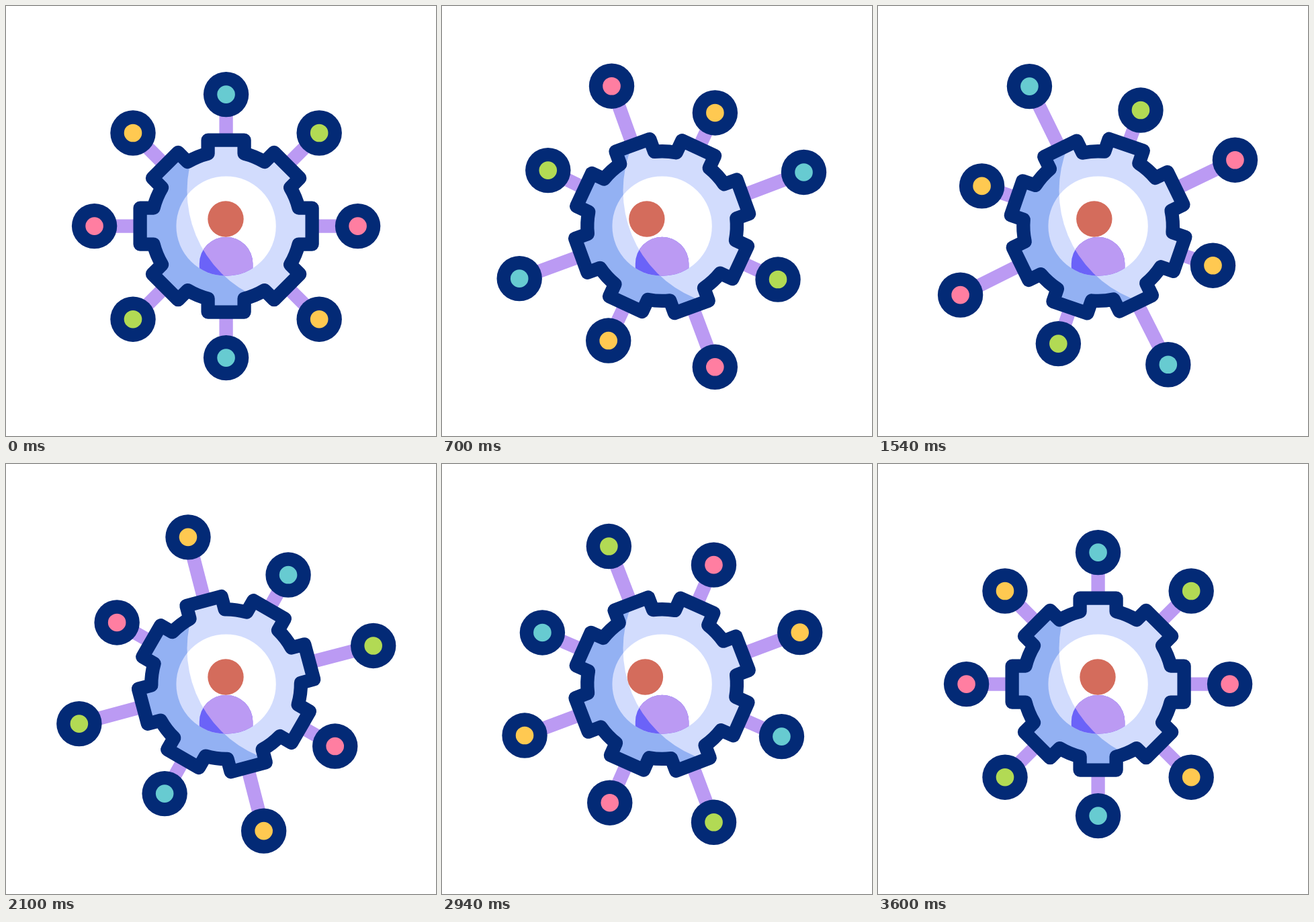
These frames come from a looping animation (640x640 px, 3.62 s). An HTML page with a canvas:

```html
<!DOCTYPE html>
<html lang="en">
<head>
<meta charset="utf-8">
<title>Gear network</title>
<style>
  html, body { margin: 0; width: 100%; height: 100%; overflow: hidden; background: #fff; }
  canvas { display: block; width: 640px; height: 640px; }
</style>
</head>
<body>
<canvas id="stage" width="640" height="640"></canvas>
<script>
const ctx = document.getElementById('stage').getContext('2d');
const LOOP = 3620, STEP = 20, TURN = 3600;
const CENTER = 327.6, ORBIT = 196, LINE = 20.3, INNER = 74.2;
const NAVY = '#032a76', LILAC = '#bb9af3', LIGHT = '#d2dcfd', SHADE = '#93b1f3';
const TEAL = '#67cbd1', GREEN = '#b2da54', PINK = '#ff7ea1', YELLOW = '#ffc951';

// Offsets are [radial, tangential] at the odd and even beats.
const nodes = [
  { angle: 0,   color: PINK,   odd: [-18, -1.8],   even: [36.5, -2.3] },
  { angle: 45,  color: YELLOW, odd: [38.5, 2.3],   even: [-16.3, 0] },
  { angle: 90,  color: TEAL,   odd: [-17.9, -1.3], even: [39.2, -0.6] },
  { angle: 135, color: GREEN,  odd: [38.9, 1.1],   even: [-15.5, 3.9] },
  { angle: 180, color: PINK,   odd: [-17.3, -1.4], even: [33.4, 1.1] },
  { angle: 225, color: YELLOW, odd: [38.5, 2.9],   even: [-18.8, -0.4] },
  { angle: 270, color: TEAL,   odd: [-17.9, -2.1], even: [38.4, -3.4] },
  { angle: 315, color: GREEN,  odd: [38.9, -0.3],  even: [-14.5, -1] }
];

const rad = deg => deg * Math.PI / 180;
const mix = (a, b, k) => a + (b - a) * k;
const smooth = x => x * x * (3 - 2 * x);

// Eases through evenly spaced keys; key(i) gives the value at beat i.
function tween(t, beats, key) {
  const p = t / TURN * beats;
  const i = Math.min(Math.floor(p), beats - 1);
  return mix(key(i), key(i + 1), smooth(p - i));
}

function nodeOffset(node, t, axis) {
  return tween(t, 9, i => i % 9 === 0 ? 0 : (i % 2 ? node.odd : node.even)[axis]);
}

function headOffset(t) {
  return tween(t, 6, i => i % 6 === 0 ? 0 : (i % 2 ? -26 : 26));
}

function disc(x, y, r, color) {
  ctx.fillStyle = color;
  ctx.beginPath();
  ctx.arc(x, y, r, 0, 2 * Math.PI);
  ctx.fill();
}

function buildGear() {
  const gear = new Path2D();
  const half = 27, base = 108, tip = 128;
  const root = Math.hypot(half, base), slope = Math.atan2(half, base);
  for (let i = 0; i < 8; i++) {
    const a = i * Math.PI / 4, c = Math.cos(a), s = Math.sin(a);
    const to = (x, y) => gear.lineTo(x * c - y * s, x * s + y * c);
    to(base, -half);
    to(tip, -half);
    to(tip, half);
    to(base, half);
    gear.arc(0, 0, root, a + slope, a + Math.PI / 4 - slope);
  }
  gear.closePath();
  return gear;
}
const gear = buildGear();

// Paints the dark colour everywhere, then the lit colour inside a large disc.
function paintLit(dark, lit) {
  ctx.fillStyle = dark;
  ctx.fillRect(0, 0, 640, 640);
  disc(442.5, 275, 173, lit);
}

function clipped(path, paint) {
  ctx.save();
  ctx.clip(path);
  paint();
  ctx.restore();
}

const innerCircle = new Path2D();
innerCircle.arc(CENTER, CENTER, INNER, 0, 2 * Math.PI);

const torso = new Path2D();
torso.arc(CENTER, 383.5, 39.8, Math.PI, 0);
torso.lineTo(CENTER + 39.8, 410);
torso.lineTo(CENTER - 39.8, 410);
torso.closePath();

function drawNodes(t, spin) {
  const placed = nodes.map(node => {
    const a = rad(node.angle) + spin;
    const r = ORBIT + nodeOffset(node, t, 0), side = nodeOffset(node, t, 1);
    return {
      x: CENTER + r * Math.cos(a) - side * Math.sin(a),
      y: CENTER + r * Math.sin(a) + side * Math.cos(a),
      color: node.color
    };
  });
  ctx.strokeStyle = LILAC;
  ctx.lineWidth = LINE;
  for (const { x, y } of placed) {
    ctx.beginPath();
    ctx.moveTo(CENTER, CENTER);
    ctx.lineTo(x, y);
    ctx.stroke();
  }
  for (const { x, y, color } of placed) {
    disc(x, y, 33.7, NAVY);
    disc(x, y, 13.3, color);
  }
}

function drawGear(spin) {
  const turned = new Path2D();
  turned.addPath(gear, new DOMMatrix().translate(CENTER, CENTER).rotate(spin * 180 / Math.PI));
  clipped(turned, () => paintLit(SHADE, LIGHT));
  ctx.strokeStyle = NAVY;
  ctx.lineWidth = LINE;
  ctx.lineJoin = 'round';
  ctx.stroke(turned);
}

function drawPerson(t) {
  clipped(innerCircle, () => {
    paintLit(LIGHT, '#fff');
    clipped(torso, () => paintLit('#6b63f8', LILAC));
  });
  disc(327 + headOffset(t), 317, 26.7, '#d46c5c');
}

function draw(t) {
  const spin = t / TURN * 2 * Math.PI;
  ctx.fillStyle = '#fff';
  ctx.fillRect(0, 0, 640, 640);
  drawNodes(t, spin);
  drawGear(spin);
  drawPerson(t);
}

const start = performance.now();
function tick() {
  const elapsed = (performance.now() - start) % LOOP;
  draw(Math.floor(elapsed / STEP) * STEP);
  requestAnimationFrame(tick);
}
tick();
</script>
</body>
</html>
```
